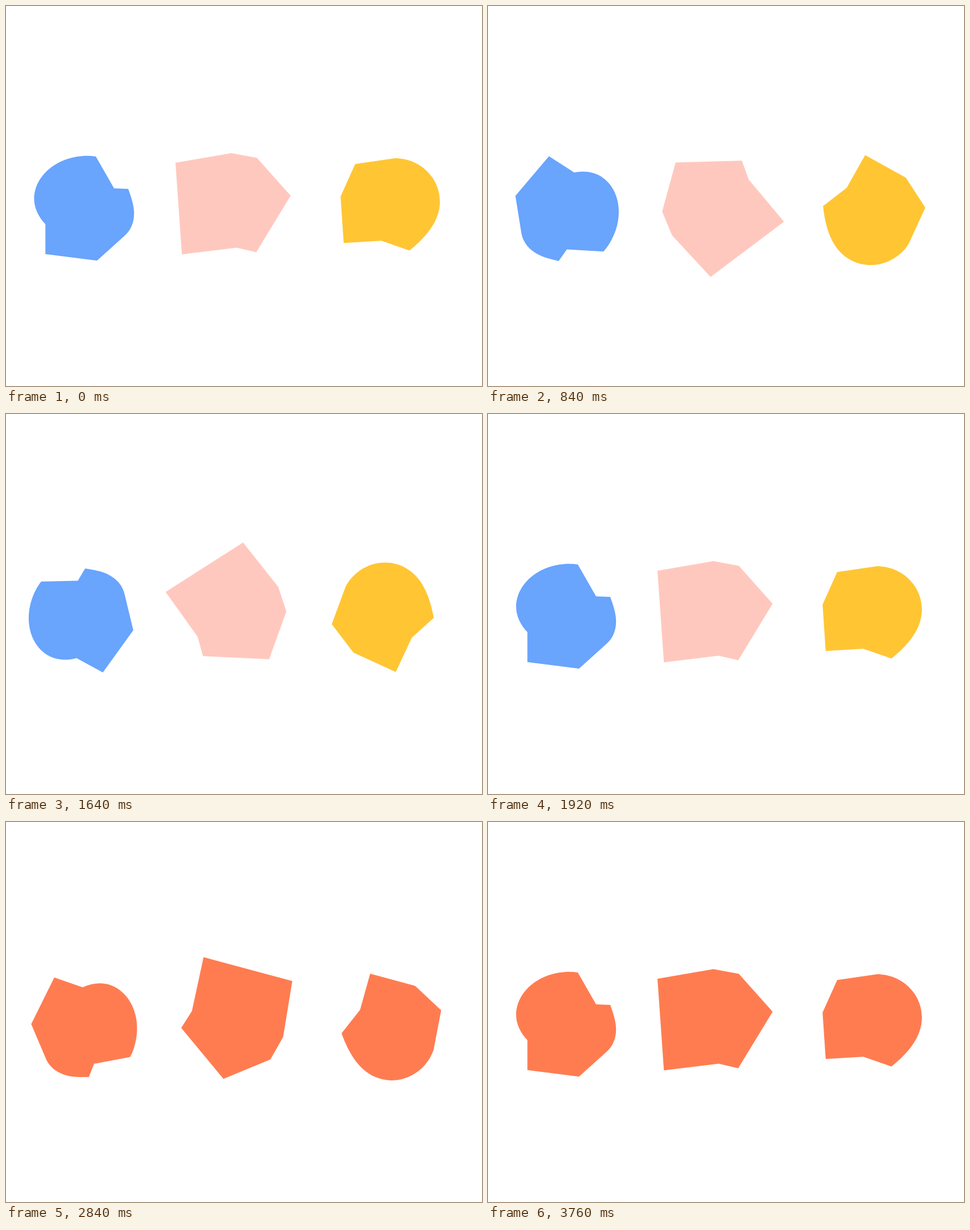
An HTML page with a canvas that plays this animation: 837x669 px, repeating every 4.32 s.

```html
<!DOCTYPE html>
<html lang="en">
<head>
<meta charset="utf-8">
<title>Spinning shapes</title>
<style>
  html, body { margin: 0; width: 100%; height: 100%; overflow: hidden; background: #fff; }
  canvas { display: block; }
</style>
</head>
<body>
<canvas id="stage" width="837" height="669"></canvas>
<script>
const ctx = document.getElementById('stage').getContext('2d');
const LOOP = 4320, TICK = 40, TURN = Math.PI * 2;
const ACCENT = [255, 124, 81];

// dir is the direction of the first spin; the second is clockwise for all.
const shapes = [
  {
    color: [105, 164, 253], pivot: [135.1, 360.85], dir: 1,
    path: new Path2D(`M158 264.9 L190 321 L215 322
      C219.5 335 225.2 350 225.2 365 C225.2 382 219 395.5 208 405
      L160 448.3 L69.3 436.7 L69.3 384
      C57 371.5 49.5 355 49.5 340 C49.5 298 91.4 263.7 143 263.7
      Q150.5 263.7 158 264.9Z`)
  },
  {
    color: [255, 200, 190], pivot: [399.3, 351.1], dir: -1,
    path: new Path2D(`M298 276 L396.3 259 L441 267.2 L500.5 334
      L440 433.5 L405.5 425.5 L309.3 437.2Z`)
  },
  {
    color: [255, 197, 51], pivot: [670.6, 358.7], dir: 1,
    path: new Path2D(`M614 278.2 L684 268
      C727.6 268 763 302 763 344 C763 377 741 405 709.5 430.5
      L660 413.2 L593.8 417.3 L588.3 335.5Z`)
  }
];

const progress = (tick, start, steps) => Math.min(1, Math.max(0, (tick - start) / steps));

function drawShape({ color, pivot: [x, y], dir, path }, angle1, angle2, tint) {
  const rgb = color.map((c, i) => Math.round(c + (ACCENT[i] - c) * tint));
  ctx.save();
  ctx.translate(x, y);
  ctx.rotate(dir * angle1 + angle2);
  ctx.translate(-x, -y);
  ctx.fillStyle = `rgb(${rgb})`;
  ctx.fill(path);
  ctx.restore();
}

function render(time) {
  const tick = Math.floor((time % LOOP) / TICK);
  const spin1 = progress(tick, 7, 41) % 1 * TURN;
  const tint = progress(tick, 54, 3);
  const spin2 = progress(tick, 61, 33) % 1 * TURN;
  ctx.fillStyle = '#fff';
  ctx.fillRect(0, 0, 837, 669);
  for (const shape of shapes) drawShape(shape, spin1, spin2, tint);
}

const start = performance.now();
function loop() {
  render(performance.now() - start);
  requestAnimationFrame(loop);
}
loop();
</script>
</body>
</html>
```
